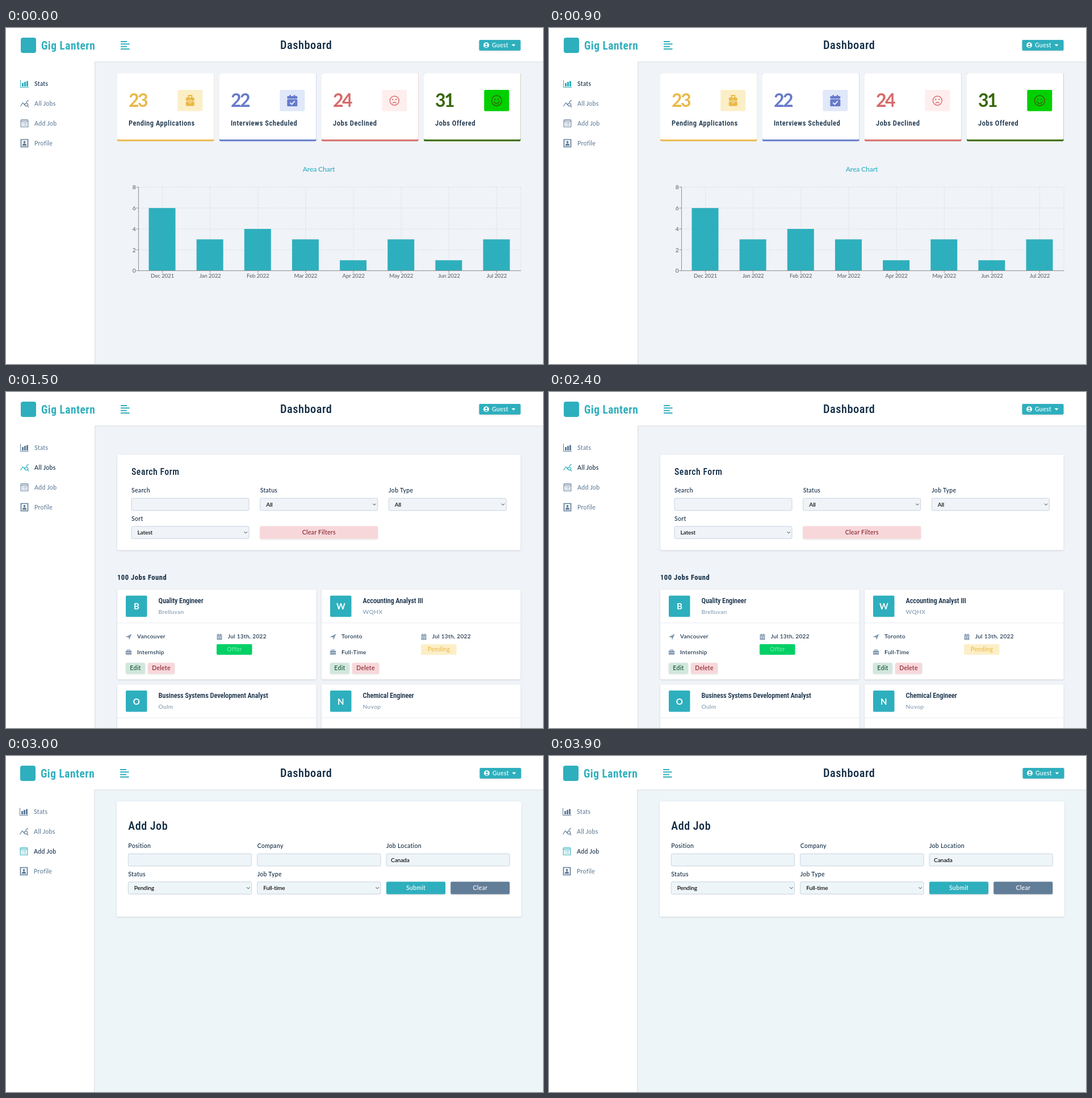
Recreate the animation shown at these times as an HTML page. Size 946 by 592 pixels, loop 4.5 s.

```html
<!DOCTYPE html>
<html lang="en">
<head>
<meta charset="utf-8">
<title>Dashboard</title>
<style>
  html, body { margin: 0; height: 100%; overflow: hidden; background: #fff; }
  svg { display: block; }
  text { font-family: Cabin, Lato, sans-serif; font-weight: 500; letter-spacing: .3px; white-space: pre; }
  .head { font-family: "Roboto Condensed", Roboto, sans-serif; font-stretch: 75%; letter-spacing: .55px; }
  .tight { letter-spacing: -.15px; }
  .title { letter-spacing: -.1px; }
  .bold { font-weight: 700; }
  .count { letter-spacing: -2.5px; }
  .shadow { filter: drop-shadow(0 1.5px 1.5px #0002); }
</style>
</head>
<body>
<svg id="stage" width="946" height="592" viewBox="0 0 946 592"></svg>
<script>
const TEAL = '#2eafbd', NAVY = '#102a43', SLATE = '#627d98', MIST = '#829ab1';
const PAPER = '#f0f3f8', ICE = '#eef5f9';

const text = (x, y, str, size = 10.5, fill = NAVY, cls = '', anchor = 'start') =>
  `<text x="${x}" y="${y}" font-size="${size}" fill="${fill}" class="${cls}" text-anchor="${anchor}">${str}</text>`;
const mid = (x, y, str, size, fill, cls) => text(x, y, str, size, fill, cls, 'middle');
const rect = (x, y, w, h, fill, r = 0, more = '') =>
  `<rect x="${x}" y="${y}" width="${w}" height="${h}" rx="${r}" fill="${fill}" ${more}/>`;
const line = (d, stroke, width = 1, more = '') =>
  `<path d="${d}" fill="none" stroke="${stroke}" stroke-width="${width}" ${more}/>`;
const fill = (d, color) => `<path d="${d}" fill="${color}" fill-rule="evenodd"/>`;
const move = (x, y, body) => `<g transform="translate(${x} ${y})">${body}</g>`;
const card = (x, y, w, h) => rect(x, y, w, h, '#fff', 2, 'class="shadow"');
const button = (x, y, w, h, bg, color, label) =>
  rect(x, y, w, h, bg, 2, 'class="shadow"') + mid(x + w / 2, y + h / 2 + 3.5, label, 10.5, color);

// Icons are drawn around their own centre.
const icons = {
  bars: c => line('M-7-6.5V6.5H7.5', c) + fill('M-4.5-1h3V5h-3zM-.5-3h3V5h-3zM3.5-4.5h3V5h-3z', c),
  trend: c => line('M-7 5L-3-1 0 2 1 0M3-2L7-6M5.5 4.5L7.5 6.5', c, 1.2) +
    `<circle cx="3.5" cy="2" r="2.7" fill="none" stroke="${c}" stroke-width="1.2"/>`,
  form: c => line('M-6.3-6H6.3V6.3H-6.3zM-6-3.2H6M-4-7V-5M-1.3-7V-5M1.3-7V-5M4-7V-5', c, 1.1) +
    line('M-4-.5h2M-1 -.5h5M-4 3h2M-1 3h5', c, 1.2),
  profile: c => line('M-6-6.5H6V6.5H-6z', c, 1.7) + fill('M-3.5 4.5V2L-1 .5H1L3.5 2V4.5z', c) +
    `<circle cy="-2" r="2" fill="${c}"/>`,
  suitcase: c => line('M-3-5V-9H3V-5', c, 2) + rect(-7.5, -5.5, 15, 6, c, 2) + rect(-7.5, 1.5, 15, 8, c, 2) +
    rect(-2, -1, 4, 5, c, 1, 'stroke="#fcefc7"'),
  check: c => rect(-9, -8, 18, 4.5, c, 1.5) + rect(-9, -2.5, 18, 12.5, c, 1.5) +
    fill('M-5-10h2.5v3H-5zM2.5-10H5v3H2.5z', c) + line('M-4 3.5L-1 6.5 4.5 .8', '#e0e8f9', 2),
  frown: c => face(c, 8, 'M-3.2 4.6Q0 .8 3.2 4.6', 1.4),
  smile: c => face(c, 9, 'M-5 1.5Q0 9 5 1.5', 1.6),
  arrow: c => fill('M-5.5 .5L5.5-5 1 5.5 0 1z', c),
  calendar: c => rect(-4.5, -4, 9, 9.5, c, 1) + fill('M-3-5.5h1.5v2H-3zM1.5-5.5H3v2H1.5z', c) +
    line('M-4.5-1.5h9M-4.5 1.3h9M-1.7-1v6M1.5-1v6', '#fff', .6),
  briefcase: c => rect(-5.2, -2.5, 10.4, 7, c, 1) + line('M-2-2.5V-4.3H2V-2.5', c, 1.2) +
    line('M-5 1h10', '#fff', .7),
};
const face = (c, r, mouth, w) => `<circle r="${r}" fill="none" stroke="${c}" stroke-width="${w}"/>` +
  `<circle cx="-3" cy="-2" r="1.2" fill="${c}"/><circle cx="3" cy="-2" r="1.2" fill="${c}"/>` + line(mouth, c, w);
const icon = (name, x, y, color) => move(x, y, icons[name](color));

const menu = [['Stats', 'bars'], ['All Jobs', 'trend'], ['Add Job', 'form'], ['Profile', 'profile']];

function shell(active, shift, bg) {
  const side = rect(26, 17, 27, 27, TEAL, 4) +
    text(62, 37.5, 'Gig Lantern', 19.3, TEAL, 'head bold') +
    line('M202 24h11M202 28.3h15.5M202 32.7h11M202 37h15.5', TEAL, 2.1) +
    menu.map(([label, name], i) =>
      icon(name, 32.5, 98 + 35 * i, i === active ? TEAL : SLATE) +
      text(50, 101.5 + 35 * i, label, 10.5, i === active ? NAVY : SLATE)).join('');
  const guest = rect(833.5, 21, 73, 18.7, TEAL, 2, 'class="shadow"') +
    '<circle cx="846" cy="30.2" r="5" fill="#fff"/>' +
    `<circle cx="846" cy="28.7" r="1.8" fill="${TEAL}"/>` + fill('M843 33Q846 30.5 849 33Q846 35.3 843 33z', TEAL) +
    text(856, 34, 'Guest', 10.5, '#fff') + fill('M890.5 28.7h7l-3.5 3.7z', '#fff');
  const left = 156 - shift;
  return rect(left, 59, 790 + shift, 533, bg) +
    line(`M946 59.7H${left + .5}V592`, '#dfe3e8') + line(`M946 60.7H${left + 1.5}V592`, '#e8ecf1') +
    move(-shift, 0, side) + mid(528.7, 37, 'Dashboard', 20.3, NAVY, 'head') + move(shift, 0, guest);
}

function stats() {
  const cards = [
    [23, 'Pending Applications', '#e9b949', '#fcefc7', 'suitcase'],
    [22, 'Interviews Scheduled', '#647acb', '#e0e8f9', 'check'],
    [24, 'Jobs Declined', '#d66a6a', '#ffeeee', 'frown'],
    [31, 'Jobs Offered', '#366606', '#00d000', 'smile'],
  ].map(([count, label, color, tint, name], i) => move(196 + 180 * i, 80,
    rect(0, 0, 170.5, 119.5, color, 2) + rect(0, 0, 170.5, 116.5, '#fff', 2) +
    text(20, 59, count, 32, color, 'bold count') + text(20, 92, label, 12.5, NAVY, 'head') +
    rect(106.3, 29, 44, 37.5, tint, 2) + icon(name, 128.3, 48, color)));

  const step = 84.15, unit = 18.4, base = 427.6, months = ['Dec 2021'];
  for (const m of ['Jan', 'Feb', 'Mar', 'Apr', 'May', 'Jun', 'Jul']) months.push(m + ' 2022');
  let grid = 'M907 280V428', axis = `M233.5 280V${base}H907`, labels = '', bars = '';
  for (let v = 0; v <= 8; v += 2) {
    const y = base - v * unit;
    grid += `M233 ${y}H907`;
    axis += `M229.5 ${y}h4`;
    labels += text(228.5, y + 3.7, v, 10.3, '#666', 'tight', 'end');
  }
  [6, 3, 4, 3, 1, 3, 1, 3].forEach((v, i) => {
    const x = 275.5 + step * i;
    grid += `M${x} 280V428`;
    axis += `M${x} ${base}v4`;
    labels += mid(x, 440, months[i], 9.7, '#666', 'tight');
    bars += rect(x - 24, base - v * unit, 47, v * unit, TEAL);
  });
  return cards.join('') + mid(551, 253, 'Area Chart', 12.2, TEAL, 'tight') +
    line(grid, '#d3d9d5', .8, 'stroke-dasharray="2.2"') + bars + line(axis, '#858585', .9) + labels;
}

const field = (bg, x, y, w, label, value = '', select = false) =>
  text(x, y - 10, label) + rect(x, y + .3, w, 21.5, bg, 2, 'stroke="#c3d0de" stroke-width=".9"') +
  text(x + (select ? 10.5 : 8), y + 14.7, value, 10.2, '#000', 'tight') +
  (select ? line(`M${x + w - 8.5} ${y + 9.7}l2.7 2.7 2.7-2.7`, '#333', 1) : '');

function job(x, y, title, company, place = '', type = '', status = 'Pending') {
  const [bg, color] = status === 'Offer' ? ['#00d066', '#73efa8'] : ['#fcefc7', '#e9b949'];
  return move(x, y, card(0, 0, 350.5, 158) + rect(15, 10.5, 37.5, 37.5, TEAL, 2) +
    mid(34, 35, company[0], 15, '#fff', 'bold') +
    text(72.5, 23.7, title, 12.4, NAVY, 'head title') +
    text(72.5, 42.5, company, 10.3, MIST) + line('M0 58.5H350.5', '#e6ebf1') +
    icon('arrow', 20, 83, MIST) + text(35, 86.2, place, 10.1) +
    icon('calendar', 180, 83, MIST) + text(194.7, 86.2, 'Jul 13th, 2022', 10.1) +
    icon('briefcase', 20, 110, MIST) + text(35, 113.7, type, 10.1) +
    rect(175, 96, 62.5, 18.7, bg, 2) + mid(206.5, 109, status, 10.5, color) +
    button(15, 129, 34, 19, '#d1e7dd', '#0f5132', 'Edit') +
    button(54, 129, 47, 19, '#f8d7da', '#842029', 'Delete'));
}

const allJobs = () => card(196, 110.5, 710.5, 168) + text(221, 146, 'Search Form', 15.7, NAVY, 'head') +
  field(PAPER, 221, 187, 207, 'Search') + field(PAPER, 447.7, 187, 207, 'Status', 'All', true) +
  field(PAPER, 674.3, 187, 207, 'Job Type', 'All', true) +
  field(PAPER, 221, 236.5, 207, 'Sort', 'Latest', true) +
  button(447.5, 236.5, 207.5, 22, '#f8d7da', '#842029', 'Clear Filters') +
  text(196, 331, '100 Jobs Found', 12.5, NAVY, 'head bold') +
  job(196, 348.3, 'Quality Engineer', 'Brelluvan', 'Vancouver', 'Internship', 'Offer') +
  job(556, 348.3, 'Accounting Analyst III', 'WQHX', 'Toronto', 'Full-Time') +
  job(196, 515.5, 'Business Systems Development Analyst', 'Oulm') +
  job(556, 515.5, 'Chemical Engineer', 'Nuvop');

const addJob = () => card(195, 80, 713, 203) + text(215.3, 130, 'Add Job', 20, NAVY, 'head') +
  field(ICE, 215.3, 172, 217.3, 'Position') + field(ICE, 442.7, 172, 217.3, 'Company') +
  field(ICE, 670, 172, 217.3, 'Job Location', 'Canada') +
  field(ICE, 215.3, 221.5, 217.3, 'Status', 'Pending', true) +
  field(ICE, 442.7, 221.5, 217.3, 'Job Type', 'Full-time', true) +
  button(670, 221.5, 104, 22, TEAL, '#fff', 'Submit') + button(783.3, 221.5, 104, 22, SLATE, '#fff', 'Clear');

const stage = document.getElementById('stage');
stage.innerHTML = [
  shell(0, 0, PAPER) + stats(),
  shell(1, 0, PAPER) + allJobs(),
  shell(2, 1, ICE) + addJob(),
].map(page => `<g>${page}</g>`).join('');

function show(now) {
  const current = Math.floor(now % 4500 / 1500);
  [...stage.children].forEach((page, i) => page.style.display = i === current ? '' : 'none');
  requestAnimationFrame(show);
}
show(0);
</script>
</body>
</html>
```
